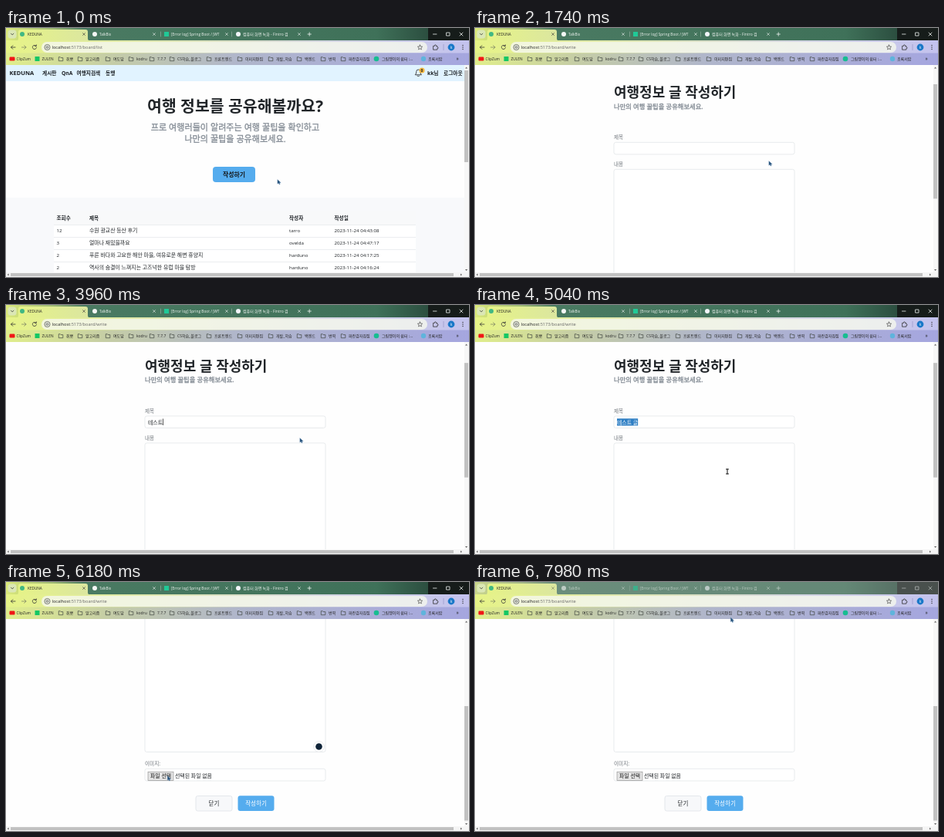
These frames come from a looping animation (600 px wide and 323 px high, 8000 ms). An HTML page:

```html
<!DOCTYPE html>
<html lang="ko">
<head>
<meta charset="utf-8">
<title>Board</title>
<style>
html, body { margin: 0; width: 100%; height: 100%; overflow: hidden; background: #fff; }
svg { display: block; width: 100vw; height: 100vh; }
text { font-family: "Open Sans", "Noto Sans CJK KR", "Noto Sans CJK", sans-serif; white-space: pre; }
.bold { font-weight: 700; }
.lead { stroke: #858d96; stroke-width: .3; }
.mid { text-anchor: middle; }
.line { fill: none; stroke-linecap: round; stroke-linejoin: round; }
.field { fill: #fff; stroke: #dee2e6; stroke-width: .7; }
</style>
</head>
<body>
<svg viewBox="0 0 600 323">
  <defs>
    <linearGradient id="strip">
      <stop offset="0" stop-color="#dcea7c"/><stop offset=".1" stop-color="#a0ba74"/>
      <stop offset=".17" stop-color="#4a7a62"/><stop offset=".8" stop-color="#3f7159"/>
      <stop offset=".91" stop-color="#2c4f40"/>
    </linearGradient>
    <linearGradient id="active">
      <stop offset="0" stop-color="#e6f387"/><stop offset="1" stop-color="#dbe6a0"/>
    </linearGradient>
    <linearGradient id="tools">
      <stop offset="0" stop-color="#e6f387"/><stop offset=".35" stop-color="#dfe6b4"/>
      <stop offset=".7" stop-color="#d3d5e2"/><stop offset="1" stop-color="#c3c2ee"/>
    </linearGradient>
    <linearGradient id="marks">
      <stop offset="0" stop-color="#e0ee8b"/><stop offset=".22" stop-color="#c5cda6"/>
      <stop offset=".5" stop-color="#b0b6cb"/><stop offset="1" stop-color="#a5a6df"/>
    </linearGradient>
    <clipPath id="view"><rect y="48" width="594" height="269"/></clipPath>
  </defs>
  <rect width="600" height="323" fill="#fefefe"/>

  <g clip-path="url(#view)">
    <g id="page">
      <g id="list"></g>
      <g id="write"></g>
      <g id="nav"></g>
    </g>
  </g>

  <g id="bars">
    <rect x="594" y="48" width="6" height="269" fill="#f7f7f7"/>
    <rect y="317" width="600" height="6" fill="#f5f5f5"/>
    <rect id="thumb" x="594" width="5" fill="#c1c1c1"/>
    <rect x="6" y="318" width="574" height="4" fill="#c1c1c1"/>
    <path d="M595 52.5l1.600-2 1.600 2zM595 313l1.600 2 1.600-2zM3.600 318.400l-2 1.600 2 1.600zM589 318.400l2 1.600-2 1.600z" fill="#666"/>
  </g>

  <g id="chrome">
    <rect width="600" height="17" fill="url(#strip)"/>
    <rect x="547" width="53" height="16" fill="#161c1a"/>
    <rect id="inactive" width="600" height="16" fill="#a9b3ad" opacity=".35"/>
    <rect y="16" width="600" height="17" fill="url(#tools)"/>
    <rect y="32.5" width="600" height="15.5" fill="url(#marks)"/>
    <path d="M13 16.500q3 0 3-3V5q0-3 3-3h84q3 0 3 3v8.500q0 3 3 3z" fill="url(#active)"/>
    <rect x="2.500" y="2.500" width="11" height="11" rx="3.500" fill="#dbe7b5"/>
    <rect x="46" y="18" width="500" height="14" rx="7" fill="#f6f8ee" fill-opacity=".82"/>
    <g class="line" stroke="#333" stroke-width=".8">
      <path d="M6.500 7.200l1.700 1.700 1.700-1.700M12 25H6.500m2.300-2.300L6.500 25l2.300 2.300M39 23.300a2.600 2.600 0 1 0 .5 2.200M39.300 21.800v1.800h-1.800"/>
      <path d="M20.500 25H26m-2.300-2.300L26 25l-2.300 2.300" stroke="#7f8665"/>
      <path d="M536.500 22l.9 2 2.200.2-1.700 1.500.5 2.200-1.900-1.100-1.900 1.100.5-2.200-1.700-1.500 2.200-.2z" stroke-width=".6"/>
      <path d="M554 23.300h1.500v-.6a.9.900 0 0 1 1.800 0v.6h1.500v1.600h.4a.9.900 0 0 1 0 1.800h-.4v1.500H554z"/>
    </g>
    <circle cx="53.500" cy="25" r="3.600" fill="#dfe3d6" stroke="#555" stroke-width=".7"/>
    <circle cx="53.500" cy="25" r="1.300" fill="none" stroke="#444" stroke-width=".6"/>
    <path d="M567 21v8" stroke="#8d8fc4" stroke-width=".6"/>
    <circle cx="577" cy="25" r="4.400" fill="#1a78c8"/>
    <g fill="#333"><circle cx="592" cy="22.500" r=".7"/><circle cx="592" cy="25" r=".7"/><circle cx="592" cy="27.500" r=".7"/></g>
  </g>
  <g id="tabs">
    <g class="line" stroke="#eef3f0" stroke-width=".8">
      <path d="M391 8h4.400M393.200 5.800v4.400M553.500 8h4.500M571 6h4v4h-4zM588 6l4 4m0-4l-4 4"/>
      <path id="crosses" stroke-width=".6"/>
      <path d="M200.500 5v6M292.500 5v6" stroke="#9fb8aa" stroke-width=".6"/>
      <path d="M99.500 6.500l3 3m0-3l-3 3" stroke="#333" stroke-width=".6"/>
    </g>
  </g>

  <g id="arrow">
    <path d="M.8.5v5.800l1.400-1.100.9 1.900 1.100-.5-.8-1.800h1.900z" fill="#234f78" stroke="#7fa3c8" stroke-width=".3"/>
  </g>
  <path id="beam" class="line" d="M-1.500-3h3M0-3v6M-1.500 3h3" stroke="#111" stroke-width="1"/>
</svg>

<script>
const LOOP = 8000, STEP = 60;
const OPENED = 900, FIELD_CLICK = 1150, AREA_CLICK = 5160, BLUR = 6540;
const MAX_SCROLL = 205;
const $ = id => document.getElementById(id);

function add(parent, name, attrs, content = '') {
  const node = document.createElementNS('http://www.w3.org/2000/svg', name);
  for (const key in attrs) node.setAttribute(key, attrs[key]);
  node.textContent = content;
  return parent.appendChild(node);
}
const text = (parent, x, y, size, content, fill = '#1d2125', cls = '') =>
  add(parent, 'text', { x, y, 'font-size': size, fill, class: cls }, content);
const box = (parent, x, y, width, height, attrs) =>
  add(parent, 'rect', { x, y, width, height, ...attrs });
const dot = (parent, cx, cy, r, fill) => add(parent, 'circle', { cx, cy, r, fill });

function buildChrome() {
  const chrome = $('chrome'), tabs = $('tabs');
  dot(chrome, 21, 8, 3, '#41b883');
  text(chrome, 28, 10, 4.7, 'KEDUNA', '#222');
  dot(tabs, 115, 8, 3, '#f4f6f5');
  text(tabs, 121, 10, 4.7, 'TalkBix', '#f2f6f3');
  box(tabs, 205, 5, 6, 6, { fill: '#20c997' });
  text(tabs, 214, 10, 4.8, '[Error log] Spring Boot / JWT', '#f2f6f3');
  dot(tabs, 301, 8, 3, '#f1f4f8');
  text(tabs, 307, 10, 5, '컴퓨터 화면 녹화 - Fintro 검', '#f2f6f3');
  $('crosses').setAttribute('d', [192, 286, 380]
    .map(x => `M${x - 1.5} 6.500l3 3m0-3l-3 3`).join(''));

  text(chrome, 577, 27, 5, 'k', '#fff', 'mid');
  const url = add(chrome, 'text', { x: 59.5, y: 27.2, 'font-size': 5.65, fill: '#666' });
  add(url, 'tspan', { fill: '#222' }, 'localhost');
  const path = add(url, 'tspan', {});

  box(chrome, 4.5, 37.5, 7, 5, { rx: 1.2, fill: '#f01616' });
  text(chrome, 13.5, 41.8, 4.8, 'ClipZum', '#222');
  box(chrome, 37.5, 37, 6, 6, { fill: '#14c764' });
  text(chrome, 46.5, 41.8, 4.8, 'ZULEN', '#222');
  const folders = [
    [71, '취뽀'], [96, '알고리즘'], [132, '여도담'], [162, 'kodru'], [189, '7.7.7'],
    [215, 'CS학습_블로그'], [263, '프론트엔드'], [303, '이미지편집'], [343, '개발_학습'],
    [380, '백엔드'], [411, '번역'], [437, '파란감자칩집']
  ];
  for (const [x, name] of folders) {
    add(chrome, 'path', {
      class: 'line', stroke: '#40463f', 'stroke-width': .7,
      d: `M${x - 2.7} 42.300v-4.600h2l.8.900h2.700v3.700z`
    });
    text(chrome, x + 7, 41.8, 5, name, '#222');
  }
  dot(chrome, 480, 40, 3.3, '#17bd91');
  text(chrome, 487, 41.8, 5, '그림쟁이의 쉼터 :...', '#222');
  dot(chrome, 541, 40, 3.2, '#5fb4dc');
  text(chrome, 547, 41.8, 5, '초록서랍', '#222');
  text(chrome, 583.5, 42, 6.5, '»', '#222');
  return path;
}

function buildNav() {
  const nav = $('nav');
  box(nav, 0, 48, 594, 21, { fill: '#e1f3ff' });
  text(nav, 4.5, 61.3, 7.5, 'KEDUNA', '#1b1f23', 'bold');
  const items = [[47, '게시판'], [72, 'QnA'], [91.5, '여행지검색'], [129, '동행'],
    [546, 'kk님'], [567, '로그아웃']];
  for (const [x, label] of items) text(nav, x, 61, 6.7, label, '#1b1f23', 'bold');
  add(nav, 'path', {
    class: 'line', stroke: '#222', 'stroke-width': .8,
    d: 'M530.500 60.500q1.300-1 1.300-4a2.500 2.500 0 0 1 5 0q0 3 1.300 4zM533 62.200q1.300 1 2.600 0'
  });
  dot(nav, 539, 55, 3.6, '#f5b942');
  text(nav, 539, 56.9, 5, '0', '#222', 'mid bold');
}

function buildList() {
  const list = $('list');
  box(list, 0, 220, 594, 97, { fill: '#f8f9fb' });
  text(list, 297, 108.5, 20.5, '여행 정보를 공유해볼까요?', '#212529', 'mid bold');
  text(list, 297, 132.5, 11.1, '프로 여행러들이 알려주는 여행 꿀팁을 확인하고', '#858d96', 'mid lead');
  text(list, 297, 147.5, 11.1, '나만의 꿀팁을 공유해보세요.', '#858d96', 'mid lead');
  box(list, 268, 180, 55, 20, { rx: 4, fill: '#55acee' });
  text(list, 295.5, 193, 7.9, '작성하기', '#16191c', 'mid bold');

  box(list, 62, 237, 469, 18, { fill: '#f8f9fa' });
  box(list, 62, 255, 469, 62, { fill: '#fff' });
  const columns = [65.5, 108, 367, 425.5];
  ['조회수', '제목', '작성자', '작성일'].forEach((label, i) =>
    text(list, columns[i], 249, 6.6, label, '#212529', 'bold'));
  const rows = [
    ['12', '수원 광교산 등산 후기', 'tarro', '04:43:08'],
    ['3', '얼마나 재밌을까요', 'ovelda', '04:47:17'],
    ['2', '푸른 바다와 고요한 해안 마을, 여유로운 해변 휴양지', 'harduno', '04:17:25'],
    ['2', '역사의 숨결이 느껴지는 고즈넉한 유럽 마을 탐방', 'harduno', '04:16:24']
  ];
  rows.forEach(([views, title, author, time], i) => {
    const y = 265 + i * 16.1;
    box(list, 62, y - 9.9, 469, .6, { fill: '#dee2e6' });
    [views, title, author, '2023-11-24 ' + time].forEach((cell, c) =>
      text(list, columns[c], y, c === 1 ? 6.9 : 6.15, cell));
  });
}

function buildWrite() {
  const write = $('write'), low = MAX_SCROLL;
  const field = (y, height) => box(write, 180, y, 234, height, { rx: 2.5, class: 'field' });
  text(write, 180, 125, 18, '여행정보 글 작성하기', '#212529', 'bold');
  text(write, 180, 139.3, 8.3, '나만의 여행 꿀팁을 공유해보세요.', '#7d868f', 'lead');
  text(write, 180, 178.5, 6.6, '제목', '#70767c');
  field(183, 15.5);
  text(write, 180, 213.5, 6.6, '내용', '#70767c');
  field(218, 207.5);

  text(write, 180, 238 + low, 6.6, '이미지:', '#70767c');
  field(242.3 + low, 15.7);
  box(write, 184, 246.2 + low, 33, 11.4, { fill: '#e4e4e4', stroke: '#888', 'stroke-width': .6 });
  text(write, 200.5, 254.3 + low, 6.9, '파일 선택', '#111', 'mid');
  text(write, 219, 254.3 + low, 6.9, '선택된 파일 없음');
  box(write, 246, 277.5 + low, 47, 19.5, { rx: 2.5, fill: '#f7f8fa', stroke: '#dfe3e7', 'stroke-width': .8 });
  text(write, 269.5, 290 + low, 7.5, '닫기', '#212529', 'mid');
  box(write, 300.5, 277.3 + low, 47, 19.7, { rx: 3, fill: '#55acee' });
  text(write, 324, 290 + low, 7.5, '작성하기', '#fff', 'mid');

  const badge = add(write, 'g', {});
  add(badge, 'circle', { cx: 405.5, cy: 213.5 + low, r: 7, fill: '#fff', stroke: '#e3e5e8', 'stroke-width': .7 });
  dot(badge, 405.5, 213.5 + low, 4.3, '#0f2438');

  const mark = box(write, 184, 186.3, 0, 9.2, { fill: '#2f7fc4' });
  const typed = text(write, 184, 193.6, 6.9, '');
  const caret = box(write, 184, 186.5, .7, 8.5, { fill: '#111' });
  return { badge, mark, typed, caret };
}

const path = buildChrome();
buildNav();
buildList();
const form = buildWrite();

const scrollKeys = [[0, 0], [1620, 0], [1800, 39], [5340, 39], [5880, MAX_SCROLL]];
const cursorX = [[0, 351], [240, 351], [720, 322], [1200, 322], [1560, 380], [4500, 380],
  [4980, 327], [5340, 327], [6000, 208.5], [6960, 208.5], [7860, 330.5]];
const cursorY = [[0, 196], [240, 196], [720, 193], [1200, 193], [1560, 172], [4500, 172],
  [4980, 216], [5340, 216], [6000, 251], [6960, 251], [7860, 45.5]];
const typing = [[0, ''], [2700, 'x'], [3120, ''], [3360, 'ㅌ'], [3480, '테'], [3600, '텟'],
  [3720, '테스'], [3840, '테슽'], [3960, '테스트'], [4080, '테스트 '], [4200, '테스트 ㄱ'],
  [4320, '테스트 그'], [4440, '테스트 글']];
const SELECTED = 4740;

const easeOut = p => 1 - (1 - p) ** 2;
const smooth = p => p * p * (3 - 2 * p);
function sample(keys, t, ease) {
  const next = keys.findIndex(key => key[0] > t);
  if (next < 0) return keys.at(-1)[1];
  const [t0, a] = keys[next - 1], [t1, b] = keys[next];
  return a + (b - a) * ease((t - t0) / (t1 - t0));
}
const show = (node, on) => node.setAttribute('visibility', on ? 'inherit' : 'hidden');

function draw(t) {
  const writing = t >= OPENED;
  const scroll = sample(scrollKeys, t, easeOut);
  show($('list'), !writing);
  show($('write'), writing);
  path.textContent = ':5173/board/' + (writing ? 'write' : 'list');
  $('page').setAttribute('transform', `translate(0 ${-scroll})`);
  $('thumb').setAttribute('y', 55 + scroll * .517);
  $('thumb').setAttribute('height', writing ? 148.5 : 119);

  const [since, value] = typing.findLast(key => key[0] <= t);
  const selected = t >= SELECTED && t < AREA_CLICK;
  form.typed.textContent = value;
  form.typed.setAttribute('fill', selected ? '#fff' : '#212529');
  const width = value ? form.typed.getComputedTextLength() : 0;
  form.mark.setAttribute('width', selected ? width : 0);
  form.caret.setAttribute('x', 184 + width);
  const blinkOn = (t - Math.max(since, FIELD_CLICK)) % 1060 < 530;
  show(form.caret, t >= FIELD_CLICK && t < SELECTED && blinkOn);
  show(form.badge, writing && t >= AREA_CLICK && t < BLUR);
  show($('inactive'), t >= BLUR);
  $('tabs').setAttribute('opacity', t >= BLUR ? .6 : 1);

  const x = sample(cursorX, t, smooth), y = sample(cursorY, t, smooth);
  const inside = (top, height) => y + scroll > top && y + scroll < top + height;
  const overField = writing && y > 48 && x > 180 && x < 414 && (inside(183, 15.5) || inside(218, 207.5));
  for (const id of ['arrow', 'beam']) $(id).setAttribute('transform', `translate(${x} ${y})`);
  show($('arrow'), !overField);
  show($('beam'), overField);
}

let start;
function frame(now) {
  start ??= now;
  draw(Math.floor((now - start) % LOOP / STEP) * STEP);
  requestAnimationFrame(frame);
}
draw(0);
requestAnimationFrame(frame);
</script>
</body>
</html>
```
